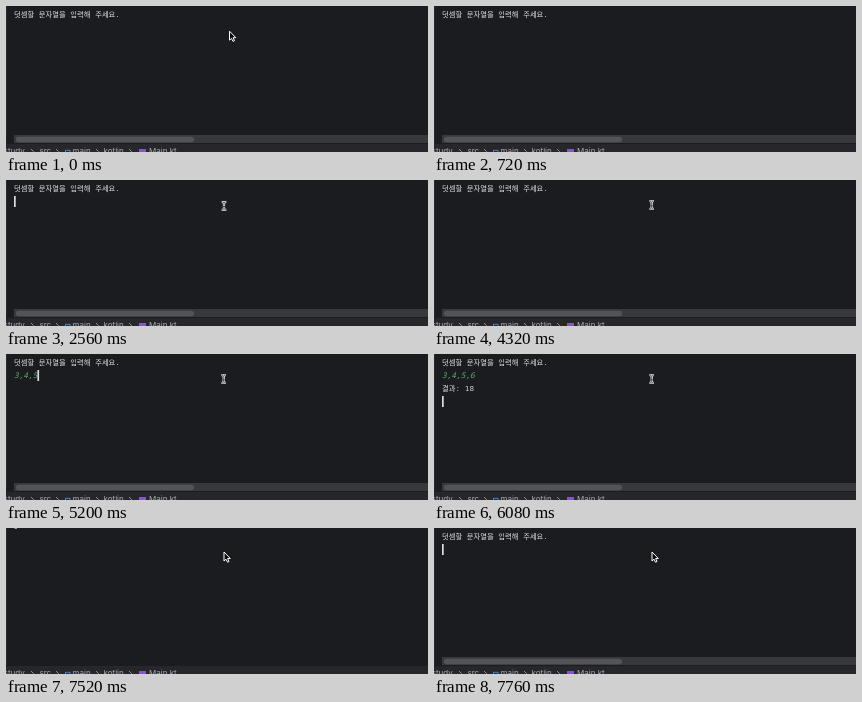
These frames come from a looping animation (422x146 px, 8000 ms). An HTML page with a canvas:

```html
<!DOCTYPE html>
<html lang="ko">
<head>
<meta charset="utf-8">
<title>Console</title>
<style>
  html, body { margin: 0; width: 100%; height: 100%; overflow: hidden; background: #1b1c1f; }
  canvas { display: block; }
</style>
</head>
<body>
<canvas width="422" height="146"></canvas>
<script>
const ctx = document.querySelector('canvas').getContext('2d');
const LOOP = 8000, STEP = 80, LEFT = 8, LINE = 13;
const BACK = '#1b1c1f', TEXT = '#e2e3e7';
const INPUT = '3,4,5,6';
const MONO = '7.8px "Noto Sans Mono", "DejaVu Sans Mono", monospace';
const HANGUL = '7.3px "Noto Sans CJK KR", "Noto Sans CJK", sans-serif';

// [time, number of typed characters]
const typed = [[0, 0], [3200, 1], [3760, 0], [4800, 1], [4880, 2], [4960, 3],
  [5120, 4], [5200, 5], [5280, 6], [5440, 7], [7520, 0]];
// [time, caret row], 0 hides it
const carets = [[0, 0], [2320, 1], [2880, 0], [3200, 1], [3680, 0], [3760, 1], [4320, 0],
  [4800, 1], [5760, 2], [6000, 3], [6400, 5], [6560, 0], [7760, 1]];
// [time, pointer, x, y]
const pointers = [[0, arrow, 223.5, 25.2], [400, arrow, 222, 58], [480, arrow, 218, 112], [560, null],
  [1840, beam, 253, 3], [1920, beam, 242, 12], [2000, beam, 230, 20], [2080, beam, 221, 25],
  [2160, beam, 218, 25.8], [3680, beam, 217.8, 25.5], [3840, beam, 217.7, 25],
  [7520, arrow, 218, 24]];

const at = (list, t) => list.findLast(e => e[0] <= t);

function rect(color, x, y, w, h, r = 0) {
  ctx.fillStyle = color;
  ctx.beginPath();
  ctx.roundRect(x, y, w, h, r);
  ctx.fill();
}

function line(text, row, color = TEXT, style = '') {
  let x = LEFT;
  ctx.fillStyle = color;
  for (const run of text.match(/[가-힣]+|[^가-힣]+/g) || []) {
    ctx.font = style + (/[가-힣]/.test(run) ? HANGUL : MONO);
    ctx.fillText(run, x, 11.3 + row * LINE);
    x += ctx.measureText(run).width;
  }
  return x;
}

function arrow(x, y) {
  const p = new Path2D('M0 0V9L2 7.2L3.5 10.2L5 9.5L3.6 6.5H6.3Z');
  ctx.save();
  ctx.translate(x, y);
  ctx.fillStyle = '#08080a';
  ctx.fill(p);
  ctx.strokeStyle = '#fff';
  ctx.lineWidth = 1;
  ctx.stroke(p);
  ctx.restore();
}

function beam(x, y) {
  const p = new Path2D('M-2.3-4Q-.3-4 0-2.6Q.3-4 2.3-4M0-2.6V2.6M-2.3 4Q-.3 4 0 2.6Q.3 4 2.3 4M-1 .8H1');
  ctx.save();
  ctx.translate(x, y);
  for (const [color, width] of [['#fff', 2.2], ['#18181a', .7]]) {
    ctx.strokeStyle = color;
    ctx.lineWidth = width;
    ctx.stroke(p);
  }
  ctx.restore();
}

function breadcrumbs() {
  rect('#27272b', 0, 138, 422, 8);
  ctx.font = '8px Inter, sans-serif';
  ctx.fillStyle = '#a9abb0';
  for (const [name, x] of [['study', -2.3], ['src', 33.5], ['main', 66.5], ['kotlin', 97.5], ['Main.kt', 143]])
    ctx.fillText(name, x, 148.3);
  ctx.strokeStyle = '#9a9ca1';
  ctx.lineWidth = .9;
  for (const x of [25, 50, 90, 123]) ctx.stroke(new Path2D(`M${x} 143l2.5 2.5l-2.5 2.5`));
  ctx.strokeStyle = '#4a88d8';
  ctx.strokeRect(59.5, 144.3, 4.5, 4.5);
  rect('#8556c9', 133, 143, 7, 7);
}

function consoleText(t) {
  line('덧셈할 문자열을 입력해 주세요.', 0);
  const inputEnd = line(INPUT.slice(0, at(typed, t)[1]), 1, '#5cb870', 'italic ');
  if (t >= 6000 && t < 7520) line('결과: 18', 2);
  if (t >= 6400 && t < 7520) line('종료 코드 0(으)로 완료된 프로세스', 4);
  const row = at(carets, t)[1];
  if (row) rect('#dcdde2', row === 1 ? inputEnd : LEFT, 3 + row * LINE, 1.7, 11);
}

function draw(t) {
  rect(BACK, 0, 0, 422, 146);
  rect('#292a2e', 0, 0, 1, 137);
  if (t >= 7520 && t < 7680) {
    rect('#a5a7ab', 8.5, 0, 2.5, .9);
  } else {
    rect('#38393d', 8, 129, 414, 8);
    rect('#535457', 10, 130.8, 178, 5.4, 2.7);
    consoleText(t);
  }
  breadcrumbs();
  const [, pointer, x, y] = at(pointers, t);
  if (pointer) pointer(x, y);
}

const start = performance.now();
function tick() {
  const t = (performance.now() - start) % LOOP;
  draw(Math.floor(t / STEP) * STEP);
  requestAnimationFrame(tick);
}
tick();
</script>
</body>
</html>
```
